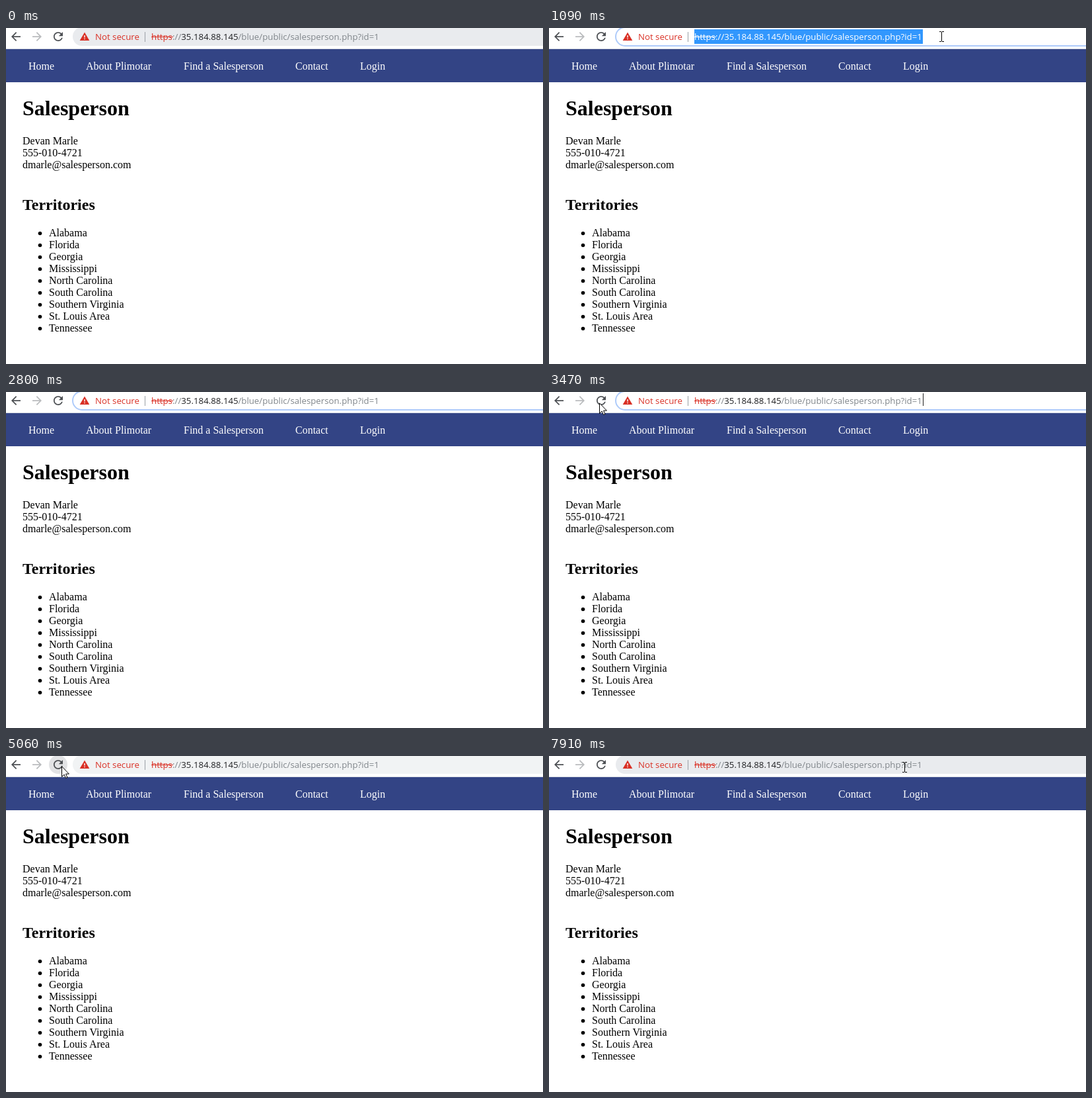
An HTML page for the animation above (8000 ms loop, 813 by 508 pixels).

```html
<!DOCTYPE html>
<html lang="en">
<head>
<meta charset="utf-8">
<title>Salesperson</title>
<style>
  html, body { margin: 0; width: 100%; height: 100%; overflow: hidden; background: #fff; }
  svg { display: block; }
  .page { font: 16px "Liberation Serif", "Times New Roman", serif; }
  .nav { fill: #fff; }
  h1, .h1 { font-size: 32px; font-weight: bold; }
  .h2 { font-size: 24px; font-weight: bold; }
  .bar { font: 13.26px "Open Sans", "Noto Sans", sans-serif; }
  .red { fill: #d93025; }
  .dim { fill: #80868b; }
  .host { fill: #202124; }
  .selected text { fill: #fff; }
  .selected #strike { fill: #fff; }
</style>
</head>
<body>
<svg width="813" height="508" viewBox="0 0 813 508">
  <defs>
    <path id="back" d="M20 11H7.83l5.59-5.59L12 4l-8 8 8 8 1.41-1.41L7.83 13H20z"/>
    <path id="reload" d="M17.65 6.35C16.2 4.9 14.21 4 12 4c-4.42 0-7.99 3.58-7.99 8s3.57 8 7.99 8c3.73 0 6.84-2.55 7.73-6h-2.08c-.82 2.33-3.04 4-5.65 4-3.31 0-6-2.69-6-6s2.69-6 6-6c1.66 0 3.14.69 4.22 1.78L13 11h7V4z"/>
  </defs>
  <rect width="813" height="508" fill="#fff"/>

  <g class="page">
    <rect y="31" width="813" height="1" fill="#d6dae3"/>
    <rect y="32" width="813" height="50" fill="#334485"/>
    <g class="nav" id="nav"></g>
    <text class="h1" x="25" y="132">Salesperson</text>
    <g id="person"></g>
    <text class="h2" x="25" y="275">Territories</text>
    <g id="list"></g>
  </g>

  <circle id="hover" cx="79" cy="13" r="14" fill="#e2e3e5"/>
  <use href="#back" transform="translate(4.5 2.5) scale(.875)" fill="#4d5054"/>
  <use href="#back" transform="translate(57.5 2.5) scale(-.875 .875)" fill="#babcbe"/>
  <use href="#reload" transform="translate(68.5 2.5) scale(.875)" fill="#4d5054"/>

  <rect id="box" x="101" y="-1" width="760" height="28" rx="14"/>
  <path class="red" d="M119 6.5L126.3 19H111.7Z"/>
  <path fill="#fff" d="M118.3 11h1.4v3.6h-1.4zM118.3 15.8h1.4v1.4h-1.4z"/>
  <rect x="210" y="6" width="1" height="15" fill="#9aa0a6"/>
  <rect id="selection" x="220" y="2" width="346" height="22" fill="#3297fd"/>
  <g class="bar">
    <text class="red" x="135" y="18">Not secure</text>
    <g id="url">
      <text class="red" x="220" y="18">https</text>
      <text class="dim" x="252" y="18">://</text>
      <text class="host" x="265.3" y="18">35.184.88.145</text>
      <text class="dim" x="351.4" y="18">/blue/public/salesperson.php?id=1</text>
      <rect id="strike" class="red" x="220" y="13" width="33" height="1"/>
    </g>
  </g>
  <rect id="caret" x="566" y="2" width="1" height="19" fill="#222"/>

  <path id="arrow" d="M.5 .8V16.4L4.1 13L6.5 18.4L8.9 17.4L6.6 12.1H11.4Z" fill="#fff" stroke="#000" stroke-width="1"/>
  <path id="beam" d="M-3 -8h3v1h1v-1h3v1h-3v14h3v1h-3v-1h-1v1h-3v-1h3v-14h-3z" fill="#000"/>
</svg>
<script>
const LOOP = 8000;
const $ = id => document.getElementById(id);

function addText(parent, x, y, str) {
  const el = document.createElementNS("http://www.w3.org/2000/svg", "text");
  el.setAttribute("x", x);
  el.setAttribute("y", y);
  el.textContent = str;
  parent.append(el);
}

function addBullet(parent, y) {
  const el = document.createElementNS("http://www.w3.org/2000/svg", "circle");
  el.setAttribute("cx", 51.5);
  el.setAttribute("cy", y);
  el.setAttribute("r", 2.8);
  parent.append(el);
}

[[34, "Home"], [121, "About Plimotar"], [269, "Find a Salesperson"], [438, "Contact"], [536, "Login"]]
  .forEach(([x, str]) => addText($("nav"), x, 63, str));
["Devan Marle", "555-010-4721", "dmarle@salesperson.com"]
  .forEach((str, i) => addText($("person"), 25, 176 + 18 * i, str));
["Alabama", "Florida", "Georgia", "Mississippi", "North Carolina", "South Carolina",
 "Southern Virginia", "St. Louis Area", "Tennessee"].forEach((str, i) => {
  addBullet($("list"), 310.5 + 18 * i);
  addText($("list"), 65, 315 + 18 * i, str);
});

// Pointer positions: start time, shape, x, y
const pointer = [
  [0, "none"],
  [820, "arrow", 664, 44], [950, "beam", 600, 17], [1090, "beam", 594, 13],
  [2490, "arrow", 0, 397], [2800, "none"],
  [3190, "arrow", 79, -9], [3340, "arrow", 72, 6], [3470, "arrow", 76, 16],
  [3610, "arrow", 80, 18], [3730, "arrow", 83, 19], [3850, "arrow", 84, 20],
  [4930, "arrow", 84, 17], [5060, "arrow", 84, 15],
  [6010, "arrow", 78, 15], [6670, "arrow", 78, 16], [6810, "arrow", 82, 18],
  [7640, "beam", 470, 12], [7760, "beam", 553, 13], [7910, "beam", 538, 17]
];

const within = (t, a, b) => t >= a && t < b;
const show = (id, on) => $(id).setAttribute("visibility", on ? "visible" : "hidden");

function render(t) {
  const focused = within(t, 520, 3730);
  const selected = within(t, 520, 1250);
  const barHover = t < 520 || t >= 7640;
  const box = $("box");
  box.setAttribute("fill", focused ? "#fff" : barHover ? "#e9ebee" : "#f1f3f4");
  box.setAttribute("stroke", focused ? "#aecbfa" : "none");
  box.setAttribute("stroke-width", 2);

  show("selection", selected);
  $("url").setAttribute("class", selected ? "selected" : "");
  show("caret", within(t, 1250, 1680) || within(t, 2240, 2800) || within(t, 3340, 3730));
  show("hover", within(t, 3610, 7640));

  const [, shape, x, y] = pointer.findLast(p => p[0] <= t);
  for (const id of ["arrow", "beam"]) {
    show(id, id === shape);
    if (id === shape) $(id).setAttribute("transform", `translate(${x} ${y})`);
  }
}

const start = performance.now();
function tick() {
  render((performance.now() - start) % LOOP);
  requestAnimationFrame(tick);
}
tick();
</script>
</body>
</html>
```
